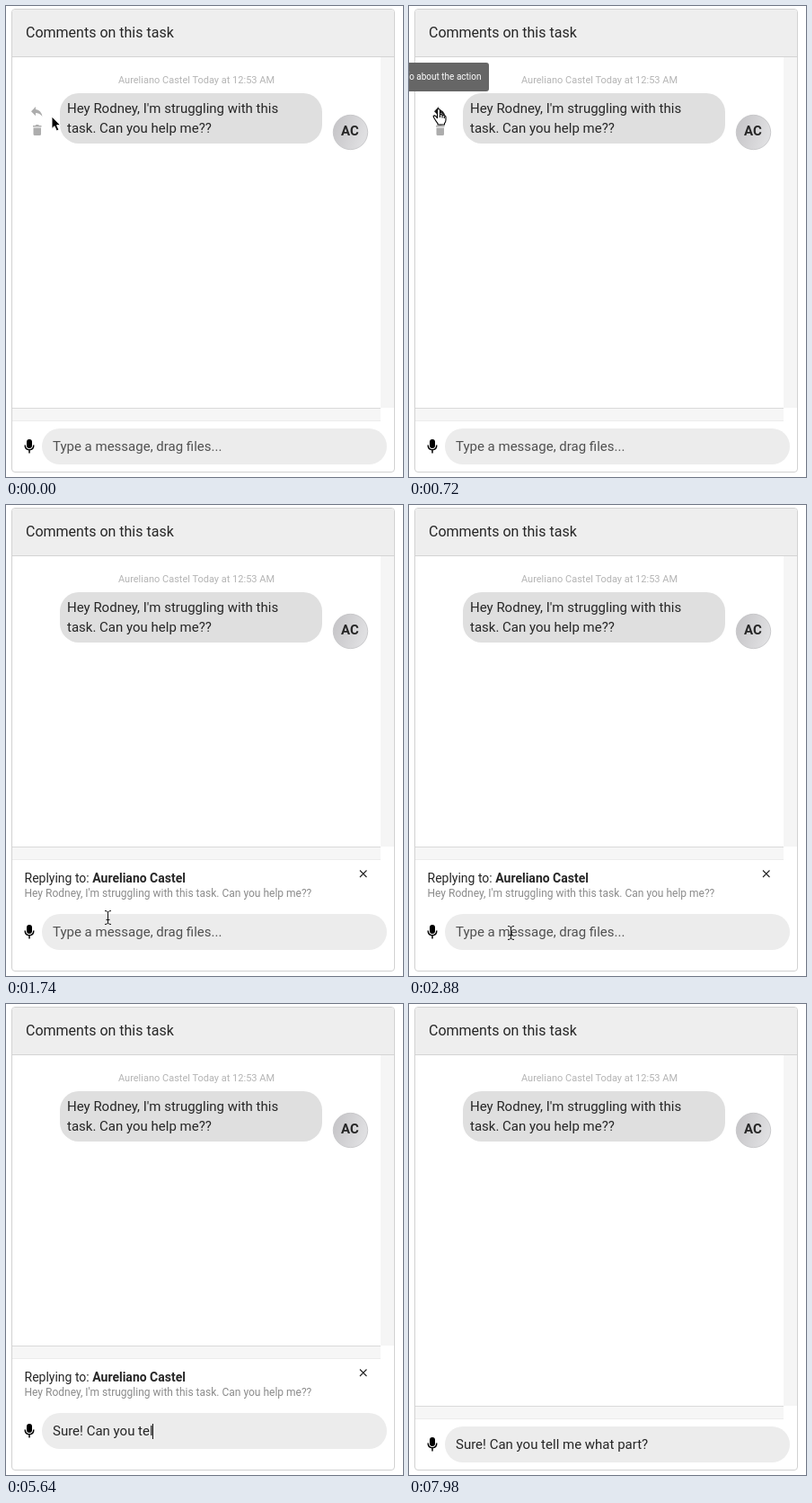
These frames come from a looping animation (442 px wide and 524 px high, 8 s). An HTML page:

```html
<!DOCTYPE html>
<html lang="en">
<head>
<meta charset="utf-8">
<title>Comments on this task</title>
<style>
  html, body { margin: 0; width: 100%; height: 100%; overflow: hidden; background: #fff; }
  svg { display: block; width: 442px; height: 524px; }
  text { font-family: Roboto, sans-serif; fill: #262626; white-space: pre; }
  .body { font-size: 15px; }
  .icon { fill: #adadad; }
</style>
</head>
<body>
<svg viewBox="0 0 442 524">
  <defs>
    <linearGradient id="metal" x2="1" y2=".35">
      <stop offset="0" stop-color="#c3c2c5"/>
      <stop offset="1" stop-color="#dfdfe1"/>
    </linearGradient>
  </defs>

  <rect x="6.5" y="3.5" width="426" height="515" rx="3.5" fill="#fff" stroke="#d2d2d2"/>
  <path d="M7 56V7q0-3 3-3h419q3 0 3 3v49z" fill="#eee"/>
  <path d="M7 56.5H432" stroke="#d4d4d4"/>
  <text x="22" y="35" font-size="16">Comments on this task</text>

  <!-- scroll gutters -->
  <rect id="gutterV" x="417" y="57" width="15" fill="#f5f5f5"/>
  <g id="gutterH">
    <rect x="7" width="410" height="14" fill="#f6f6f6"/>
    <path d="M7 .5H417" stroke="#dadada"/>
    <path d="M7 14.5H417" stroke="#ececec"/>
  </g>

  <text x="212" y="86" font-size="11" text-anchor="middle" style="fill:#b4b4b4">Aureliano Castel Today at 12:53 AM</text>
  <rect x="60" y="97" width="292" height="56" rx="21" fill="#dfdfdf"/>
  <text class="body" x="68" y="119">Hey Rodney, I'm struggling with this</text>
  <text class="body" x="68" y="141">task. Can you help me??</text>
  <circle cx="383.5" cy="140.5" r="19.2" fill="url(#metal)" stroke="#c2c2c4" stroke-width=".8"/>
  <text x="383" y="144" font-size="15" font-weight="700" text-anchor="middle">AC</text>

  <g id="actions" class="icon">
    <path id="replyIcon" d="M33 112v3q6 .5 7.5 8q-3-4-7.5-4v3.2l-5-5z"/>
    <path d="M30 133h2.500l1-1h2.500l1 1H39.500v1.500H30zM30.500 135.500h8.500v7q0 1.500-1.500 1.500h-5.500q-1.500 0-1.500-1.500z"/>
  </g>
  <g id="tip">
    <rect x="-21" y="63" width="110" height="32" rx="3" fill="#666"/>
    <text x="80.5" y="82" font-size="10" text-anchor="end" style="fill:#fff">Info about the action</text>
  </g>

  <g id="reply">
    <text x="20.5" y="420" font-size="14">Replying to: <tspan font-weight="700">Aureliano Castel</tspan></text>
    <text x="20.5" y="436" font-size="12" style="fill:#8b8b8b">Hey Rodney, I'm struggling with this task. Can you help me??</text>
    <path d="M394 406.500l7.500 7.500m0-7.500l-7.500 7.500" stroke="#222" stroke-width="1.1"/>
  </g>

  <g id="composer">
    <rect x="40" y="0" width="384" height="40" rx="20" fill="#ececec"/>
    <rect x="23" y="12" width="6" height="10" rx="3"/>
    <path d="M21.200 18.500q0 5.200 4.800 5.200t4.800-5.200M26 23.500V27.500" fill="none" stroke="#000" stroke-width="1.500"/>
    <text id="entry" class="body" x="52" y="25"></text>
    <rect id="caret" y="12" width="1" height="17" fill="#111"/>
  </g>

  <g id="pointer" stroke-linejoin="round">
    <path id="arrow" d="M0 0v13.500l3-2.800 2.300 5.200 2.600-1.100-2.300-5.100h4.200z" fill="#000" stroke="#fff"/>
    <path id="hand" d="M-1.500 1.500q1.500-2 3 0v5.500q1.500-1.300 2.500.4q1.700-.9 2.300.8q1.700-.4 1.700 1.500v3q0 2.300-1.500 4v1.300h-7.500v-1.300q-1.800-2.200-3.200-4.700q-1.700-2.500-1.700-3.500q1.200-1.400 2.700.2l1.700 2z M1.500 7v3M4 8v2.500M6.300 9v2" fill="#fff" stroke="#000" stroke-width="1.100"/>
    <path id="beam" d="M-3-7.500q3 0 3.500 1.500q.5-1.500 3.500-1.500M-3 7.500q3 0 3.500-1.500q.5 1.500 3.500 1.500M.5-6V6M-1.500 2.500h4" fill="none" stroke="#111"/>
  </g>
</svg>
<script>
const LOOP = 8000, REPLY_AT = 1080, FOCUS_AT = 2100, SEND_AT = 7960;
const MESSAGE = 'Sure! Can you tell me what part?';

// [time, x, y]
const POINTER = [
  [0, 51, 123], [80, 51, 123], [460, 33, 114], [1140, 33, 114],
  [1640, 112, 452], [1740, 113, 459], [1940, 113, 476], [LOOP, 113, 476]
];
// [time, characters typed]
const TYPING = [
  [0, 0], [3300, 0], [4100, 6], [5600, 17], [6720, 25], [7720, 32], [LOOP, 32]
];

const $ = Object.fromEntries([...document.querySelectorAll('[id]')].map(el => [el.id, el]));
const show = (el, on) => { el.style.display = on ? '' : 'none'; };
const move = (el, x, y) => el.setAttribute('transform', `translate(${x} ${y})`);
const smooth = p => p * p * (3 - 2 * p);

function sample(track, t, ease = p => p) {
  const i = track.findIndex(step => step[0] > t);
  const [t0, ...from] = track[i - 1], [t1, ...to] = track[i];
  const p = ease((t - t0) / (t1 - t0));
  return from.map((v, k) => v + (to[k] - v) * p);
}

function draw(t) {
  const replying = t >= REPLY_AT && t < SEND_AT;
  const logBottom = replying ? 380 : 447;
  show($.reply, replying);
  $.gutterV.setAttribute('height', logBottom - 57);
  move($.gutterH, 0, logBottom);
  move($.composer, 0, replying ? 455 : 470);

  const [x, y] = sample(POINTER, t, smooth);
  const overIcon = x < 41 && y < 124, overEntry = replying && y > 452;
  move($.pointer, x, y);
  show($.hand, overIcon);
  show($.beam, overEntry);
  show($.arrow, !overIcon && !overEntry);
  show($.actions, y < 155);
  $.replyIcon.style.fill = overIcon ? '#222' : '';
  $.tip.style.opacity = t < REPLY_AT ? Math.min(1, Math.max(0, (t - 400) / 150)) : 0;

  const count = Math.floor(sample(TYPING, t)[0] + 1e-6);
  show($.pointer, count === 0);
  $.entry.textContent = count ? MESSAGE.slice(0, count) : 'Type a message, drag files...';
  $.entry.style.fill = count ? '#262626' : '#505050';

  const blinkOn = count > 0 || (t - FOCUS_AT) % 1000 < 500;
  show($.caret, replying && t >= FOCUS_AT && blinkOn);
  $.caret.setAttribute('x', Math.round(51 + (count ? $.entry.getComputedTextLength() : 0)));
}

const start = performance.now();
function tick() {
  draw((performance.now() - start) % LOOP);
  requestAnimationFrame(tick);
}
tick();
</script>
</body>
</html>
```
